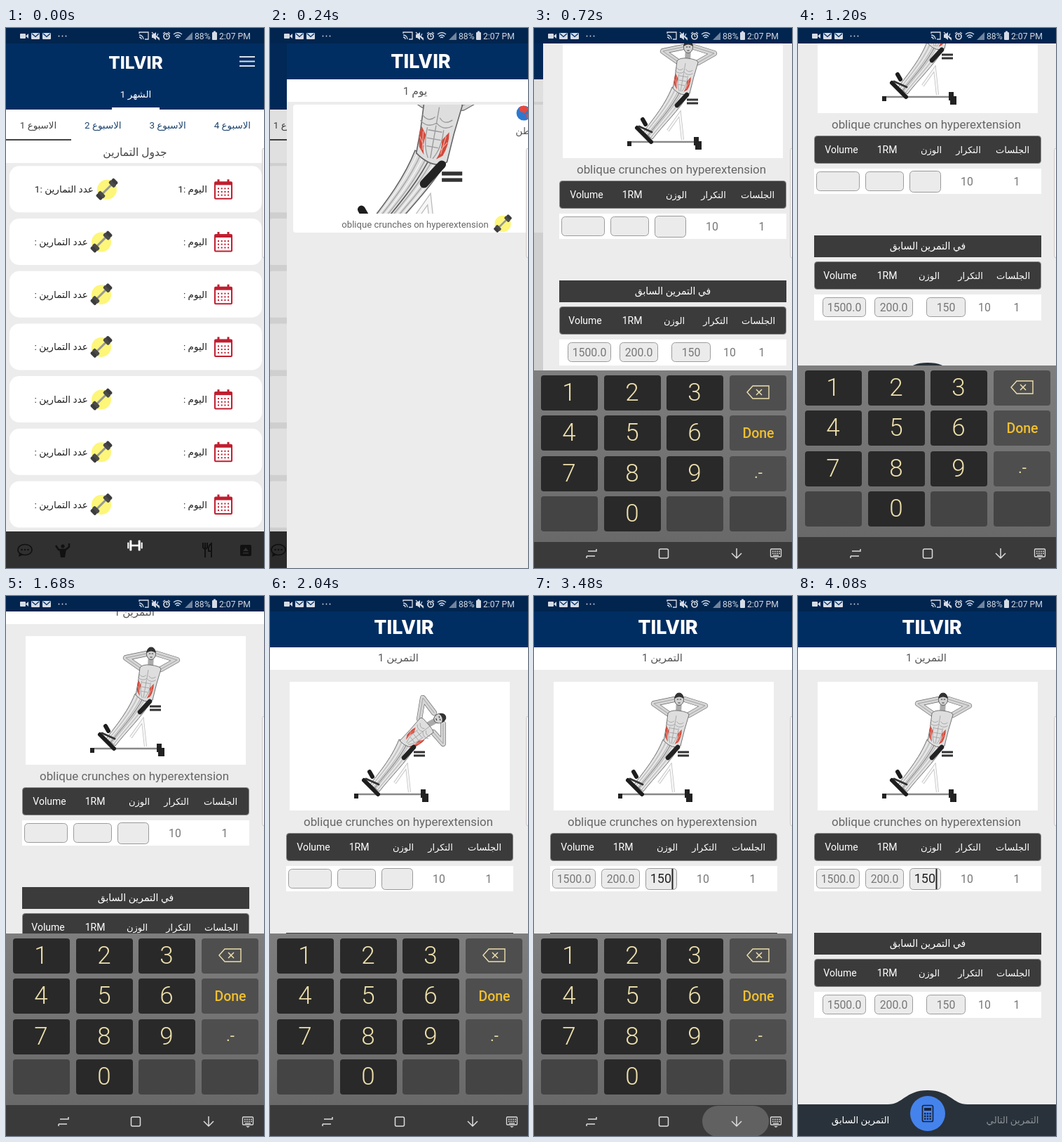
An HTML page with a canvas that plays this animation: 368x768 px, repeating every 4200 ms.

```html
<!DOCTYPE html>
<html lang="ar">
<head>
<meta charset="utf-8">
<style>
html, body { margin: 0; width: 368px; height: 768px; overflow: hidden; background: #ececec; }
canvas { display: block; }
</style>
</head>
<body>
<canvas id="stage" width="368" height="768"></canvas>
<script>
const ctx = document.getElementById('stage').getContext('2d');
const LOOP = 4200, STEP = 120, NAVY = '#012e62', DARK = '#3b3b3b', BG = '#ececec';
const BRAND = 'TILVIR', EXERCISE = 'oblique crunches on hyperextension';

const progress = (t, start, length) => Math.min(1, Math.max(0, (t - start) / length));
const easeOut = p => 1 - (1 - p) ** 3;
const easeInOut = p => p * p * (3 - 2 * p);
const mix = (a, b, u) => a.map((v, i) => v + (b[i] - v) * u);

function text(str, x, y, size, color, align = 'center', weight = 400, family = 'Roboto') {
  ctx.font = `${weight} ${size}px ${family}, "DejaVu Sans", sans-serif`;
  ctx.direction = /[\u0600-\u06ff]/.test(str) ? 'rtl' : 'ltr';
  ctx.textAlign = align;
  ctx.textBaseline = 'middle';
  ctx.fillStyle = color;
  ctx.fillText(str, x, y + 1);
}
function rect(x, y, w, h, fill) {
  ctx.fillStyle = fill;
  ctx.fillRect(x, y, w, h);
}
function paint(fill, stroke, width = 1) {
  if (fill) { ctx.fillStyle = fill; ctx.fill(); }
  if (stroke) { ctx.strokeStyle = stroke; ctx.lineWidth = width; ctx.stroke(); }
}
function round(x, y, w, h, r, fill, stroke, width) {
  ctx.beginPath();
  ctx.roundRect(x, y, w, h, r);
  paint(fill, stroke, width);
}
function disc(x, y, r, fill, stroke, width) {
  ctx.beginPath();
  ctx.arc(x, y, r, 0, 7);
  paint(fill, stroke, width);
}
function path(d, fill, stroke, width) {
  const p = new Path2D(d);
  if (fill) { ctx.fillStyle = fill; ctx.fill(p); }
  if (stroke) { ctx.strokeStyle = stroke; ctx.lineWidth = width || 1; ctx.stroke(p); }
}
function at(x, y, draw, scale = 1) {
  ctx.save();
  ctx.translate(x, y);
  ctx.scale(scale, scale);
  draw();
  ctx.restore();
}

// Icons
function calendar() {
  const red = '#c01f30';
  round(-12, -10, 24, 23.5, 1, '#fff', red, 2);
  rect(-12, -10, 24, 4, red);
  for (const x of [-7, 7]) rect(x - 1.5, -14, 3, 6, red);
  for (let i = 0; i < 12; i++) rect(-8 + (i % 4) * 4.7, -2 + Math.floor(i / 4) * 4.7, 2, 2, red);
}
function barbell(color, plate, grip) {
  rect(-6, -grip / 2, 12, grip, color);
  for (const s of [-1, 1]) {
    round(s * 7 - 1.7, -plate, 3.4, plate * 2, 1, color);
    round(s * 11 - 1.2, -plate * 0.6, 2.4, plate * 1.2, 1, color);
  }
}
function badge() {
  disc(0, 0.5, 14, '#fdf679');
  ctx.rotate(-0.78);
  rect(-9, -1.5, 18, 3, '#9a9a94');
  for (const s of [-1, 1]) {
    round(s * 11 - 3, -5.5, 6, 11, 2, '#4a4a4a');
    round(s * 15.5 - 2.5, -5, 5, 10, 2, '#3c3c3c');
  }
}
function mail() {
  round(-6, -4, 12, 9, 1, '#d5dbe5');
  path('M-5-3L0 1.5 5-3', null, NAVY, 1.3);
}

function statusBar() {
  const c = '#d5dbe5';
  rect(0, 0, 368, 22, '#01254f');
  round(20, 8, 8, 7, 1, c);
  path('M28 11.5L32 8V15Z', c);
  at(42, 11, mail);
  at(58, 11, mail);
  for (let i = 0; i < 3; i++) disc(75.5 + i * 5, 11.5, 0.9, c);
  path('M190 8V6H203V16H198M190 10A6 6 0 0 1 196 16M190 13A3 3 0 0 1 193 16', null, c, 1.3);
  path('M208 9H210L214 6V17L210 14H208Z', c);
  path('M208 6L219 17M217 8L215 12 219 15', null, c, 1.2);
  disc(229, 12, 4, null, c, 1.7);
  path('M229 9V12H231M224 8L227 6M234 8L231 6', null, c, 1.2);
  path('M239 9Q245 4 251 9M241 12Q245 8 249 12M243 14Q245 12 247 14', null, c, 1.4);
  path('M255 17L266 6V17Z', '#71839c');
  text('88%', 269, 11, 12.2, c, 'left');
  round(294, 6, 7, 11, 1, c);
  rect(296, 4.5, 3, 2, c);
  text('2:07 PM', 304, 11, 12.2, c, 'left');
}

// Athlete: joints are elbow, shoulder and hand for each side plus the head.
const UP = { head: [207, 147], eL: [171, 153], sL: [191, 167], hL: [200, 147],
  eR: [244, 156], sR: [221, 169], hR: [215, 147], lean: 10 };
const BENT = { head: [242, 174], eL: [218, 145], sL: [213, 175], hL: [234, 166],
  eR: [247, 210], sR: [233, 194], hR: [247, 182], lean: 52 };
const LEG_LEFT = [[184, 204], [173, 232], [152, 255], [143, 268]];
const LEG_RIGHT = [[209, 212], [194, 237], [172, 257], [156, 278]];

const curve = ([a, b, c, d]) => `M${a}C${b} ${c} ${d}`;

function arm(...pts) {
  const d = 'M' + pts.map(p => p.join(' ')).join('L');
  ctx.lineJoin = ctx.lineCap = 'round';
  path(d, null, '#666', 8);
  path(d, null, '#d6d6d6', 6.8);
  path(d, null, '#a2a2a2', 1);
  ctx.lineCap = 'butt';
}
function legs() {
  const back = [...LEG_RIGHT].reverse();
  path(`${curve(LEG_LEFT)}L${back[0]}C${back[1]} ${back[2]} ${back[3]}Z`, '#dcdcdc', '#666', 0.9);
  for (let i = 1; i < 10; i++) {
    const fibre = LEG_LEFT.map((p, k) => mix(p, LEG_RIGHT[k], i / 10));
    path(curve(fibre), null, i === 5 ? '#555' : i % 2 ? '#f4f4f4' : '#a8a8a8', 0.8);
  }
}
function athlete(pose) {
  // bench frame
  path('M126 282H217', null, '#888', 2.4);
  path('M120 281H126V288H120ZM215 275H222V281H226V293H217V287H215Z', '#222');
  path('M178 266L195 242 199 279', null, '#bbb', 4);
  path('M178 266L195 242 199 279', null, '#f7f7f7', 2.6);
  path('M205 222H221M205 227H221', null, '#333', 3);
  legs();
  // torso
  const { sL, sR, head } = pose;
  const [cx, cy] = mix(sL, sR, 0.5);
  const [lx, ly] = mix([185, 206], sL, 0.5), [rx, ry] = mix([209, 213], sR, 0.5);
  arm(sL, pose.eL, pose.hL);
  arm(sR, pose.eR, pose.hR);
  path(`M${cx} ${cy}L${head}`, null, '#aaa', 8);
  path(`M185 206Q${lx + 1} ${ly} ${sL}Q${sL[0] + 3} ${sL[1] - 5} ${cx} ${cy - 5}Q${sR[0]} ${sR[1] - 4} ${sR}Q${rx - 1} ${ry} 209 213Q198 219 185 206Z`, '#dedede', '#666', 0.9);
  at(196, 210, () => {
    ctx.rotate(pose.lean * Math.PI / 180);
    ctx.scale(0.92, 0.9);
    path('M-11-8Q-14-18-12-26L-7-19Q-9-11-6-2ZM10-4Q14-14 12-25L7-17Q9-9 5 0Z', '#d2493a');
    path('M-10-22L-8-6M-12-17L-7-9M10-21L8-5M12-16L7-8', null, '#eaa89f', 0.7);
    path('M0-29V0M-6-24H6M-6-17H6M-5-10H5M-7-26Q-8-10-2 0M7-26Q8-10 2 0M-14-31Q-7-25 0-31Q7-25 14-31M0-45V-30M-13-36Q-7-30-2-36M13-36Q7-30 2-36', null, '#999', 0.8);
  });
  at(head[0], head[1], () => {
    ctx.rotate((pose.lean - 10) * 1.7 * Math.PI / 180);
    ctx.scale(0.78, 1);
    disc(0, 0, 8.5, '#d2d2d2', '#555', 1);
    path('M-8.5-1A8.5 8.5 0 0 1 8.5-1Q0-6-8.5-1Z', '#333');
    path('M-4 0H-1M1 0H4M-2 5H2', null, '#333', 1.2);
  });
  // pads
  ctx.lineCap = 'round';
  path('M191 230L205 215', null, '#222', 6.5);
  path('M142 250L146 257M134 262L154 282', null, '#1d1d1d', 6);
  path('M137 260L155 268', null, '#333', 3);
  ctx.lineCap = 'butt';
}

// Screens
function header(size, x, y) {
  rect(0, 0, 368, 73, NAVY);
  text(BRAND, x, y, size, '#fff', 'center', 800, 'Inter');
}
function listScreen() {
  rect(0, 0, 368, 768, BG);
  header(24.5, 185, 50);
  rect(0, 73, 368, 43, NAVY);
  for (let i = 0; i < 3; i++) rect(333, 40 + i * 6.5, 22, 2, '#d9e0ea');
  text('الشهر 1', 185, 94, 13.5, '#fff');
  rect(151, 113, 68, 3, '#fff');
  rect(0, 116, 368, 76, '#fff');
  for (let i = 0; i < 4; i++)
    text('الاسبوع ' + (i + 1), 46 + i * 92.3, 138, 13.4, i ? '#1d446f' : '#444');
  rect(0, 158, 93, 2, '#444');
  text('جدول التمارين', 184, 176, 15.5, '#444');
  for (let i = 0; i < 7; i++) {
    const y = 229.3 + i * 74.7, shift = i ? 0 : 8, n = i ? '' : '1';
    round(5, y - 33, 360, 66, 14, '#fff');
    at(310, y, calendar);
    text('اليوم :' + n, 287, y, 13.6, '#222', 'right');
    at(136 + shift, y, badge);
    text('عدد التمارين :' + n, 117 + shift, y, 13.7, '#222', 'right');
  }
  rect(0, 716, 368, 52, '#303030');
  at(184, 736, () => barbell('#fff', 8.5, 3), 0.88);
  const ink = '#111';
  ctx.beginPath();
  ctx.ellipse(27, 742, 10, 7.5, 0, 0, 7);
  paint(null, ink, 1.6);
  path('M19 746L18 752 25 749Z', ink);
  for (let i = -1; i < 2; i++) disc(27 + i * 4.5, 742, 1.3, ink);
  disc(81, 737, 2.6, ink);
  path('M71 736L75 742H85L90 738V733', null, ink, 2.4);
  path('M76 741H86L84 753H78Z', ink);
  path('M281 732V739Q284 743 287 739V732M284 732V753M293 753V733Q288 736 289 744H293', null, ink, 2);
  round(334, 735, 16, 16, 2, ink);
  path('M338 744L342 739 346 744ZM338 746H346V747.5H338Z', '#303030');
}
function dayScreen() {
  rect(0, 0, 368, 768, BG);
  header(27, 191, 48);
  rect(0, 73, 368, 32, '#fff');
  text('يوم 1', 183, 89, 15.5, '#555');
  round(9, 109, 350, 182, 4, '#fff');
  ctx.save();
  ctx.beginPath();
  ctx.rect(9, 109, 310, 155);
  ctx.clip();
  at(-152, -197, () => athlete(UP), 1.82);
  ctx.restore();
  disc(338, 121, 10.5, '#2d78cf');
  path('M331 113Q338 108 345 114L340 121 333 119ZM341 123L348 121 343 130Z', '#e8483c');
  text('البطن', 343, 146, 13.5, '#555');
  text(EXERCISE, 183, 279, 13.1, '#666');
  at(308, 278, badge, 0.83);
}
function tableHead(y, centers) {
  round(23.5, y + 0.5, 323, 39, 4, DARK, '#8a8a8a', 1);
  ['Volume', '1RM', 'الوزن', 'التكرار', 'الجلسات'].forEach((s, i) =>
    text(s, centers[i], y + 20, i < 2 ? 14 : 13, '#fff'));
}
function field(x, w, y, value) {
  round(x + 0.5, y + 0.5, w - 1, 27, 5, '#ebebeb', '#9c9c9c', 1);
  text(value, x + w / 2, y + 14, 15.8, '#777');
}
function exerciseScreen(t, barShift) {
  rect(0, 0, 368, 1000, BG);
  header(27, 191, 45);
  rect(0, 73, 368, 32, '#fff');
  text('التمرين 1', 183, 88, 15, '#555');
  rect(28, 122, 314, 183, '#fff');
  const bent = (t >= 1920 && t < 2520) || (t >= 3600 && t < 4080);
  athlete(bent ? BENT : UP);
  text(EXERCISE, 183, 321, 16.9, '#666');

  const typed = '150'.slice(0, (t >= 2640) + (t >= 2880) + (t >= 3240));
  const weight = Number(typed);
  tableHead(337, [62, 127, 190, 243, 306]);
  rect(23, 384, 324, 36, '#fff');
  field(26, 62, 388, typed && (weight * 10).toFixed(1));
  field(96, 55, 388, typed && (weight * 4 / 3).toFixed(1));
  round(159.5, 387.5, 44, 30, 5, '#ebebeb', '#999', 1);
  if (typed) {
    text(typed, 196, 402, 18, '#222', 'right');
    rect(196.5, 388, 2, 29, '#222');
  }
  text('10', 241, 402, 15.8, '#777');
  text('1', 312, 402, 15.8, '#777');

  rect(23, 479, 324, 31, DARK);
  text('في التمرين السابق', 185, 494, 14, '#fff');
  tableHead(516, [60, 127, 187, 246, 307]);
  rect(23, 563, 324, 37, '#fff');
  field(35, 62, 567, '1500.0');
  field(109, 55, 567, '200.0');
  field(183, 56, 567, '150');
  text('10', 266, 581, 15.8, '#777');
  text('1', 312, 581, 15.8, '#777');

  at(0, barShift, () => {
    path('M0 723H128C150 723 153 703 185 703S220 723 242 723H368V1100H0Z', '#29323a');
    disc(185, 736, 25, '#4583ec');
    round(177.5, 724.5, 15, 23, 2, null, '#17243d', 1.7);
    rect(180, 728, 10, 4, '#17243d');
    for (let i = 0; i < 9; i++) rect(180 + (i % 3) * 3.7, 735 + Math.floor(i / 3) * 3.7, 2.4, 2.4, '#17243d');
    text('التمرين السابق', 89, 745, 13.3, '#fff');
    text('التمرين التالي', 306, 745, 13.3, '#8d9296');
  });
}
function keyboard(rise, drop, pressed) {
  const cream = '#eee0ac';
  at(0, rise + drop, () => {
    const g = ctx.createLinearGradient(0, 480, 0, 725);
    g.addColorStop(0, '#7e7e7e');
    g.addColorStop(1, '#696969');
    rect(0, 480, 368, 245, g);
    rect(0, 724, 368, 300, '#3a3a3a');
    for (let i = 0; i < 16; i++) {
      const col = i % 4, row = Math.floor(i / 4);
      const x = Math.round(10 + col * 89.7), y = Math.round(487 + row * 57.4);
      const digit = row < 3 ? (col < 3 ? row * 3 + col + 1 : '') : (col === 1 ? 0 : '');
      round(x, y, 81, 50, 4, digit !== '' ? '#292929' : row < 3 ? '#4e4e4e' : '#444');
      if (digit !== '') text(String(digit), x + 40, y + 25, 35, cream, 'center', 300);
    }
    path('M304 511L312 502H335V520H312Z', null, cream, 1.4);
    path('M317 507L325 515M325 507L317 515', null, cream, 1.5);
    text('Done', 320, 569, 19.5, '#f1c02e', 'center', 500);
    text('.-', 320, 626, 22, cream);
  });
  at(0, drop, () => {
    const c = '#ddd';
    if (pressed) round(240, 725, 95, 44, 22, '#616161');
    path('M77 744H89V741M75 751H87M75 751V754', null, c, 1.5);
    round(178.5, 741, 13, 13, 2, null, c, 1.5);
    path('M289 740V754M282 747L289 754 296 747', null, c, 1.5);
    round(337.5, 741, 15, 11, 1, null, c, 1.3);
    for (let i = 0; i < 8; i++) rect(340 + (i % 4) * 3, 743.5 + Math.floor(i / 4) * 3, 1.7, 1.7, c);
    rect(341, 749.5, 8, 1.2, c);
    path('M342 754H348L345 756Z', c);
  });
}

// Slides a screen in from the right while the one below drifts left and darkens.
function slideOver(x, below, above) {
  const p = 1 - x / 368;
  if (x > 0) {
    at(Math.round(-16 * p), 0, below);
    if (p > 0) rect(0, 0, 368, 768, `rgba(0,0,0,${0.13 * p})`);
  }
  if (p > 0) at(x, 0, above);
}
function draw(t) {
  const slide = start => Math.round(368 * (1 - easeOut(progress(t, start, 240))));
  const dayX = slide(97), exX = slide(559);
  const pan = Math.round(184 * (easeOut(progress(t, 600, 404)) - easeInOut(progress(t, 1200, 800))));
  const drop = Math.round(289 * easeInOut(progress(t, 3500, 400)));

  rect(0, 0, 368, 768, BG);
  if (exX === 368) slideOver(dayX, listScreen, dayScreen);
  else {
    slideOver(exX, dayScreen, () =>
      at(0, -pan, () => exerciseScreen(t, pan * (1 - 227 / 184))));
    if (drop < 289) keyboard(Math.floor(exX * 0.58), drop, t >= 3360 && t < 3720);
  }
  round(365.5, 171, 8, 156, 3, '#f6f4f4', '#cfcaca', 1);
  statusBar();
}
function tick(now) {
  const t = now % LOOP;
  draw(t - t % STEP);
  requestAnimationFrame(tick);
}
requestAnimationFrame(tick);
</script>
</body>
</html>
```
